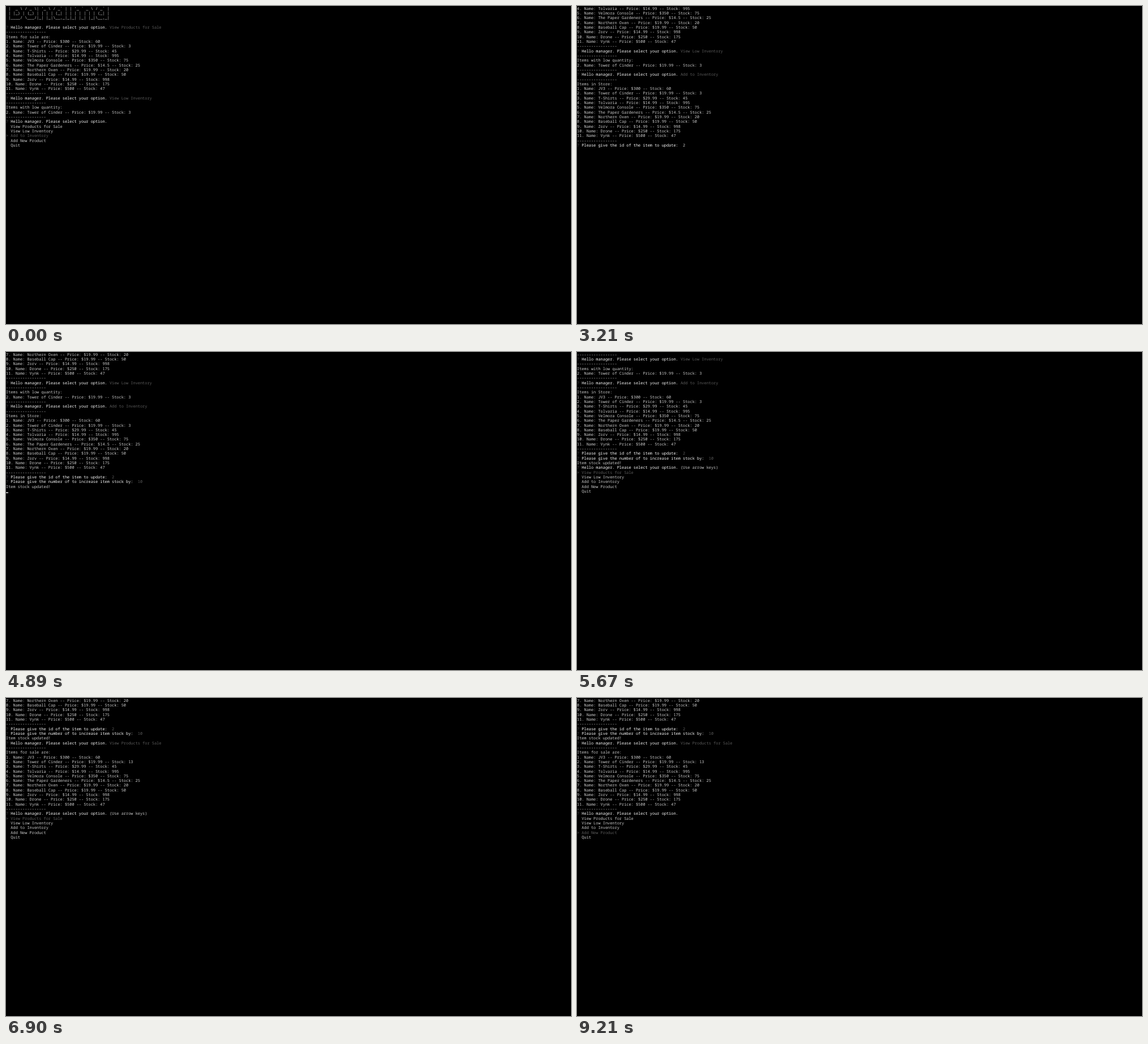
An HTML page that plays this animation: 998 by 561 pixels, repeating every 9.24 s.

```html
<!DOCTYPE html>
<html lang="en">
<head>
<meta charset="utf-8">
<title>Store manager terminal</title>
<style>
  html, body { margin: 0; width: 100%; height: 100%; overflow: hidden; background: #000; }
  /* An 8 x 16 character grid of a 1920 px wide screen, scaled to the stage */
  pre {
    position: absolute; left: 0; top: 0; margin: 0;
    font: 13.3333px/16px "Noto Sans Mono", "Liberation Mono", monospace;
    font-variant-ligatures: none;
    text-rendering: geometricPrecision;
    color: #ccc;
    transform: scale(.5198); transform-origin: 0 0;
  }
  b { font-weight: normal; color: #fff; }
  i { font-style: normal; color: #5c5c5c; }
  u { text-decoration: none; color: #484848; }
  s { display: inline-block; width: 8px; height: 15px; vertical-align: top; box-shadow: inset 0 -3px #ddd; }
</style>
</head>
<body>
<pre id="screen"></pre>
<script>
const LOOP = 9240, ROWS = 30, BLINK = 240;
const screen = document.getElementById("screen");
const rule = "-".repeat(17);

const banner = [
  " |  _ \\ / _ \\| '_ \\ / _` | | '_ ` _ \\ / _` |",
  " | |_) | (_) | | | | (_| | | | | | | | (_| |",
  " |____/ \\___/|_| |_|\\__,_|_|_| |_| |_|\\__,_|",
  ""
];
const stock = [
  ["JV3", 300, 60], ["Tower of Cinder", 19.99, 3], ["T-Shirts", 29.99, 45],
  ["Tolvaria", 14.99, 995], ["Velmora Console", 350, 75], ["The Paper Gardeners", 14.5, 25],
  ["Northern Oxen", 19.99, 20], ["Baseball Cap", 19.99, 50], ["Zorv", 14.99, 998],
  ["Drone", 250, 175], ["Vynk", 500, 47]
];
const options = ["View Products for Sale", "View Low Inventory", "Add to Inventory", "Add New Product", "Quit"];

const items = (second = 3) => stock.map(([name, price, count], n) =>
  `${n + 1}. Name: ${name} -- Price: $${price} -- Stock: ${n === 1 ? second : count}`);
const ask = (text, reply = "") => `<u>?</u> <b>${text}</b> ${reply}`;
const dim = text => `<i>${text}</i>`;
const hello = reply => ask("Hello manager. Please select your option.", reply);
const askId = reply => ask("Please give the id of the item to update:", " " + reply);
const askCount = reply => ask("Please give the number of to increase item stock by:", " " + reply);
const section = (title, rows) => [rule, title, ...rows, rule];
const menu = (picked, hint = "") => [
  hello(hint),
  ...options.map((text, n) => n === picked ? dim("> " + text) : "  " + text)
];
const cursor = (t, since) => Math.floor(Math.max(0, t - since) / BLINK) % 2 ? "" : "<s></s>";

const hint = "(Use arrow keys)";
const first = [
  ...banner,
  hello(dim(options[0])), ...section("Items for sale are:", items()),
  hello(dim(options[1])), ...section("Items with low quantity:", [items()[1]])
];
const adding = [...first, hello(dim(options[2])), ...section("Items in Store:", items())];
const counting = [...adding, askId(dim("2"))];
const updated = [...counting, askCount(dim("10")), "Item stock updated!"];
const listed = [...updated, hello(dim(options[0])), ...section("Items for sale are:", items(13))];

function linesAt(t) {
  if (t < 1200) return [...first, ...menu(2)];
  if (t < 3330) return [...adding, askId((t < 2670 ? "" : "2") + (t < 3210 ? cursor(t, 1290) : ""))];
  if (t < 4860) {
    const typed = t < 4470 ? "" : t < 4620 ? "1" : "10";
    return [...counting, askCount(typed + cursor(t, typed ? 4620 : 3330))];
  }
  if (t < 5340) return [...updated, cursor(t, 4860)];
  if (t < 6210) return [...updated, ...menu(0, hint)];
  if (t < 6780) return [...listed, cursor(t, 6300)];
  const picked = [7920, 8070, 8220].filter(press => t >= press).length;
  return [...listed, ...menu(picked, picked ? "" : hint)];
}

let shown;
function draw(now) {
  const html = linesAt(now % LOOP).slice(-ROWS).join("\n");
  if (html !== shown) screen.innerHTML = shown = html;
  requestAnimationFrame(draw);
}
draw(performance.now());
</script>
</body>
</html>
```
